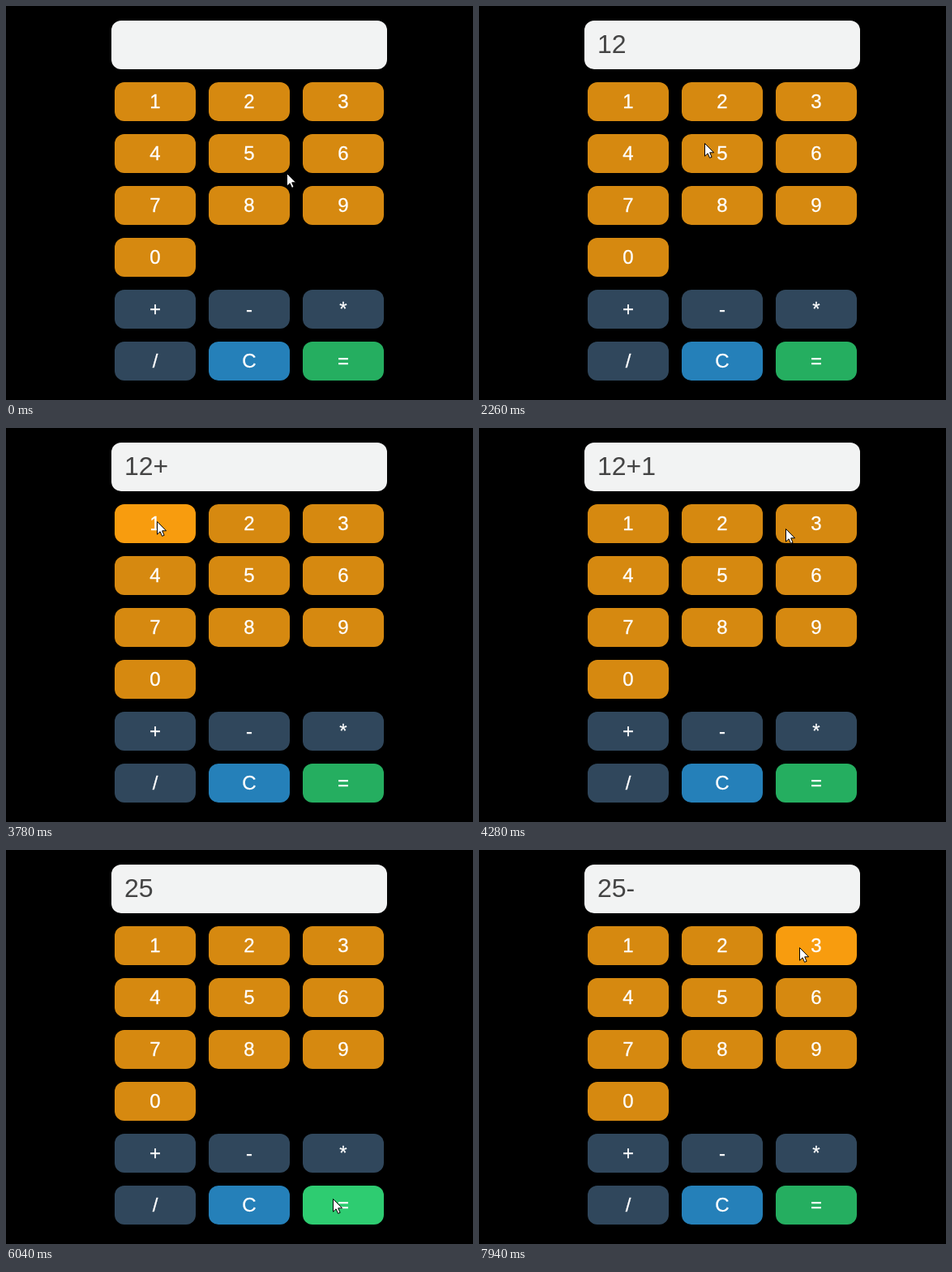
An HTML page for the animation above (8 s loop, 576x486 px).

```html
<!DOCTYPE html>
<html lang="en">
<head>
<meta charset="utf-8">
<title>Calculator</title>
<style>
  html, body { margin: 0; width: 100%; height: 100%; overflow: hidden; background: #000; }
  svg { display: block; width: 576px; height: 486px; }
  text { font-family: "Liberation Sans", Arial, sans-serif; }
  .key { font-size: 24px; text-anchor: middle; fill: #fff; stroke: #fff; stroke-width: .3; }
  #display { font-size: 32px; fill: #444; }
</style>
</head>
<body>
<svg viewBox="0 0 576 486">
  <rect width="576" height="486"/>
  <rect x="130" y="18" width="340" height="60" rx="12" fill="#f2f3f3"/>
  <text id="display" x="146" y="58"></text>
  <g id="keys"></g>
  <path id="cursor" d="M.5 .5V16.2L4.1 12.8L6.6 18.4L9.1 17.3L6.7 11.8H11.6Z" fill="#fff" stroke="#000"/>
</svg>
<script>
const LOOP = 8000, STEP = 125.9, LAST = 63;
const KEY_W = 100, KEY_H = 48, GAP = 16, LEFT = 134, TOP = 94;
const REST_SPEED = 30; // px per step; a faster pointer lights no key
const NS = "http://www.w3.org/2000/svg";
const $ = id => document.getElementById(id);

// [normal, hovered]
const ORANGE = ["#d68910", "#f89c0e"];
const SLATE = ["#30475c", "#5d6d7e"];
const BLUE = ["#2580b9", "#3498db"];
const GREEN = ["#25ae60", "#2ecc71"];
const ROWS = ["123", "456", "789", "0", "+-*", "/C="];

// pointer glides between two steps, then perhaps presses the key below it
const START = { x: 346, y: 206 };
const MOVES = [
  { from: 1, to: 5, x: 197, y: 123, press: 8 },
  { from: 9, to: 15, x: 298, y: 120, press: 16 },
  { from: 16, to: 23, x: 196, y: 366, press: 24 },
  { from: 24, to: 30, x: 186, y: 115, press: 31 },
  { from: 31, to: 35, x: 414, y: 126, press: 36 },
  { from: 36.5, to: 43, x: 418, y: 446, press: 45 },
  { from: 47, to: 51, x: 324, y: 346 },
  { from: 52, to: 54, x: 306, y: 361, press: 56 },
  { from: 57, to: 62, x: 398, y: 120 },
  { from: 62, to: 63, x: 395, y: 120 }
];

function add(name, attrs, parent) {
  const el = document.createElementNS(NS, name);
  for (const a in attrs) el.setAttribute(a, attrs[a]);
  return parent.appendChild(el);
}

function colours(label) {
  if (label === "C") return BLUE;
  if (label === "=") return GREEN;
  return /\d/.test(label) ? ORANGE : SLATE;
}

const keys = ROWS.flatMap((row, r) => [...row].map((label, c) => {
  const x = LEFT + (KEY_W + GAP) * c, y = TOP + (KEY_H + GAP) * r;
  const rect = add("rect", { x, y, width: KEY_W, height: KEY_H, rx: 12 }, $("keys"));
  add("text", { class: "key", x: x + KEY_W / 2, y: y + 32 }, $("keys")).textContent = label;
  return { label, x, y, rect, fill: colours(label) };
}));

const keyAt = p => keys.find(k =>
  p.x >= k.x && p.x < k.x + KEY_W && p.y >= k.y && p.y < k.y + KEY_H);

const ease = u => u * u * (3 - 2 * u);

function pointer(step) {
  let { x, y } = START;
  for (const m of MOVES) {
    const u = ease(Math.min(1, Math.max(0, (step - m.from) / (m.to - m.from))));
    x += (m.x - x) * u;
    y += (m.y - y) * u;
  }
  return { x, y };
}

function typed(step) {
  return MOVES.filter(m => m.press <= step).reduce((text, m) => {
    const { label } = keyAt(m);
    return label === "=" ? String(text.split("+").reduce((a, b) => a + Number(b), 0)) : text + label;
  }, "");
}

function draw(t) {
  const step = Math.min(LAST, Math.floor((t + 10) / STEP));
  const p = pointer(step), q = pointer(step - 1);
  const resting = Math.hypot(p.x - q.x, p.y - q.y) < REST_SPEED;
  const lit = resting && keyAt(p);
  for (const k of keys) k.rect.setAttribute("fill", k.fill[k === lit ? 1 : 0]);
  $("cursor").setAttribute("transform", `translate(${Math.round(p.x)} ${Math.round(p.y)})`);
  $("display").textContent = typed(step);
}

const start = performance.now();
function tick() {
  draw((performance.now() - start) % LOOP);
  requestAnimationFrame(tick);
}
tick();
</script>
</body>
</html>
```
